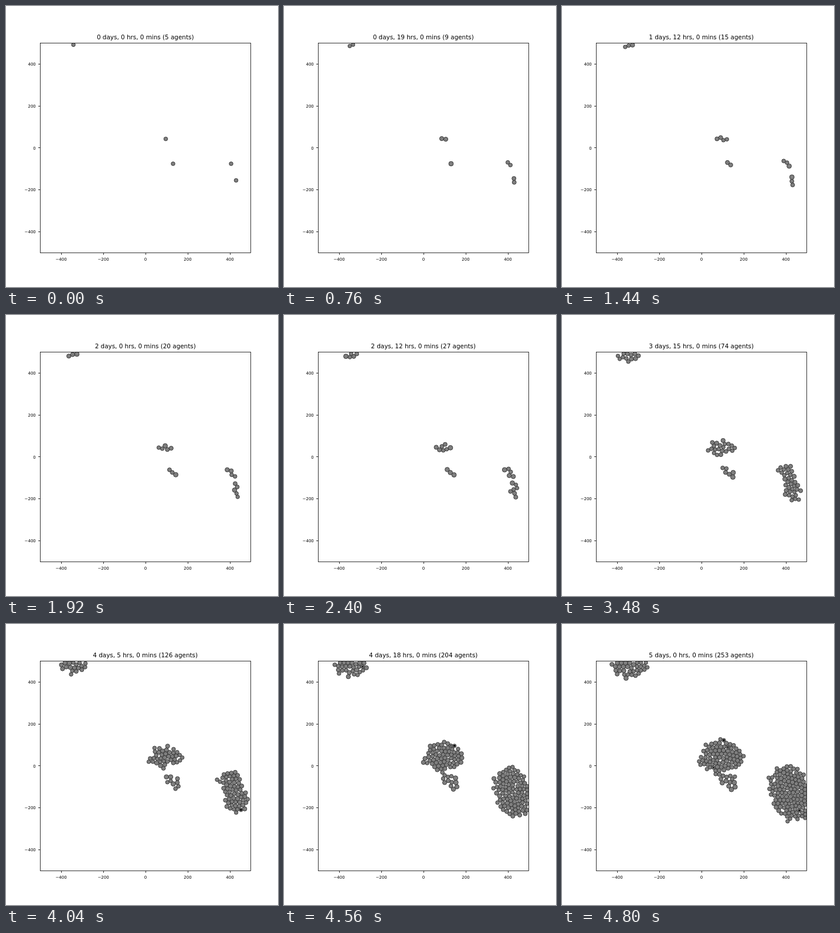
Animation of 464 by 481 pixels, one loop 4.84 s. Source, as an HTML page:

```html
<!DOCTYPE html>
<html lang="en">
<head>
<meta charset="utf-8">
<title>Colony growth</title>
<style>
  html, body { margin: 0; width: 100%; height: 100%; overflow: hidden; background: #fff; }
  svg { display: block; width: 464px; height: 481px; }
  text { font-family: "DejaVu Sans", sans-serif; font-size: 7px; fill: #000; }
  #title { font-size: 10.4px; text-anchor: middle; }
  #axes { fill: none; stroke: #000; stroke-width: .8; }
  #cells { fill: #7f7f7f; stroke: #2a2a2a; stroke-width: .85; }
</style>
</head>
<body>
<svg viewBox="0 0 464 481">
  <clipPath id="box"><rect x="58.5" y="63.5" width="359" height="359"/></clipPath>
  <g clip-path="url(#box)"><g id="cells"></g><g id="specks"></g></g>
  <g id="axes"><rect x="58.5" y="63.5" width="359" height="359"/></g>
  <g id="labels"></g>
  <text id="title" x="237.7" y="57.3"></text>
</svg>
<script>
const STEP = 40, LAST = 120;
const RIGHT = 418, TOP = 63;

// Founders: place, main axis of division, final colony size
const COLONIES = [
  { x: 115, y: 66.3, axis: -.55, size: 33 },
  { x: 272.5, y: 227.5, axis: .15, size: 82 },
  { x: 285, y: 270, axis: .65, size: 13 },
  { x: 384, y: 270, axis: .8, size: 45 },
  { x: 392.5, y: 298.5, axis: 1.5, size: 80 }];

// Population at key hours, exponential in between
const CENSUS = [[0, 5], [36, 15], [60, 27], [87, 74], [101, 126], [114, 204], [LAST, 253]];

const byId = id => document.getElementById(id);
const radius = c => 3.15 * 2 ** (Math.min(c.age, 24) / 72);
let seed = 29;
const rnd = () => (seed = (seed * 16807) % 2147483647) / 2147483647;

function add(parent, tag, attrs = {}, text = '') {
  const el = document.createElementNS('http://www.w3.org/2000/svg', tag);
  for (const key in attrs) el.setAttribute(key, attrs[key]);
  el.textContent = text;
  return byId(parent).appendChild(el);
}

function population(h) {
  const i = Math.max(1, CENSUS.findIndex(([hour]) => hour >= h));
  const [h0, n0] = CENSUS[i - 1], [h1, n1] = CENSUS[i];
  return Math.round(n0 * (n1 / n0) ** ((h - h0) / (h1 - h0)));
}

const cells = COLONIES.map(home => ({ x: home.x, y: home.y, age: 4, home }));
const members = home => cells.filter(c => c.home === home);

// Split the oldest cell of a colony; small colonies keep to their axis
function divide(home) {
  const own = members(home);
  const mother = own.map(c => ({ c, rank: c.age + rnd() * 6 }))
    .reduce((a, b) => b.rank > a.rank ? b : a).c;
  const angle = home.axis + (rnd() - .5) * Math.PI * Math.min(1, (own.length - 1) / 6);
  const dx = Math.cos(angle) * 2, dy = Math.sin(angle) * 2;
  cells.push({ x: mother.x + dx, y: mother.y + dy, age: 0, home });
  mother.x -= dx;
  mother.y -= dy;
  mother.age = 0;
}

// Overlapping cells shove each other apart, the walls hold them in
function shove() {
  const rs = cells.map(radius);
  for (let pass = 0; pass < 18; pass++) {
    cells.forEach((a, i) => {
      for (let j = 0; j < i; j++) {
        const b = cells[j], dx = a.x - b.x, dy = a.y - b.y;
        const gap = (rs[i] + rs[j]) * .96, d2 = dx * dx + dy * dy;
        if (d2 >= gap * gap) continue;
        const d = Math.sqrt(d2) || .01, push = (gap - d) / d * .42;
        a.x += dx * push; a.y += dy * push;
        b.x -= dx * push; b.y -= dy * push;
      }
    });
    cells.forEach((c, i) => {
      c.x = Math.min(c.x, RIGHT - rs[i]);
      c.y = Math.max(c.y, TOP + rs[i]);
    });
  }
}

function live(h) {
  const total = population(h);
  const stage = Math.log(total / 5) / Math.log(253 / 5);
  const lag = home => home.size ** stage / members(home).length;
  for (const c of cells) c.age++;
  while (cells.length < total) {
    divide(COLONIES.reduce((a, b) => lag(b) > lag(a) ? b : a));
  }
  shove();
}

// Crowded hours show a few black specks on newborn cells
function pickSpecks(h) {
  const young = cells.filter(c => c.age === 0);
  const count = Math.max(0, Math.round((h - 98) / 6));
  return Array.from({ length: Math.min(count, young.length) }, () => {
    const c = young[Math.floor(rnd() * young.length)];
    return [c.x, c.y, .8 + rnd()];
  });
}

const frames = [];
for (let h = 0; h <= LAST; h++) {
  if (h) live(h);
  frames.push({ cells: cells.map(c => [c.x, c.y, radius(c)]), specks: pickSpecks(h) });
}

for (let i = 0; i < 5; i++) {
  const x = 94 + 72 * i, y = 99.2 + 71.85 * i, v = 200 * i - 400;
  const label = n => String(n).replace('-', '\u2212');
  add('axes', 'path', { d: `M${Math.floor(x) + .5} 422.5v3.5M58.5 ${Math.floor(y) + .5}h-3.5` });
  add('labels', 'text', { x, y: 435.7, 'text-anchor': 'middle' }, label(v));
  add('labels', 'text', { x: 50.8, y: y + 2.6, 'text-anchor': 'end' }, label(-v));
}

const pools = {};
for (const kind of ['cells', 'specks']) {
  pools[kind] = frames[LAST][kind].map(() => add(kind, 'circle'));
}

function place(kind, list) {
  pools[kind].forEach((el, i) => {
    el.style.display = list[i] ? '' : 'none';
    if (list[i]) ['cx', 'cy', 'r'].forEach((key, j) => el.setAttribute(key, list[i][j].toFixed(2)));
  });
}

let shown = -1;
function draw(h) {
  if (h === shown) return;
  shown = h;
  const now = frames[h];
  place('cells', now.cells);
  place('specks', now.specks);
  byId('title').textContent =
    `${Math.floor(h / 24)} days, ${h % 24} hrs, 0 mins (${now.cells.length} agents)`;
}

const begin = performance.now();
function tick() {
  draw(Math.floor((performance.now() - begin) / STEP) % (LAST + 1));
  requestAnimationFrame(tick);
}
draw(0);
requestAnimationFrame(tick);
</script>
</body>
</html>
```
